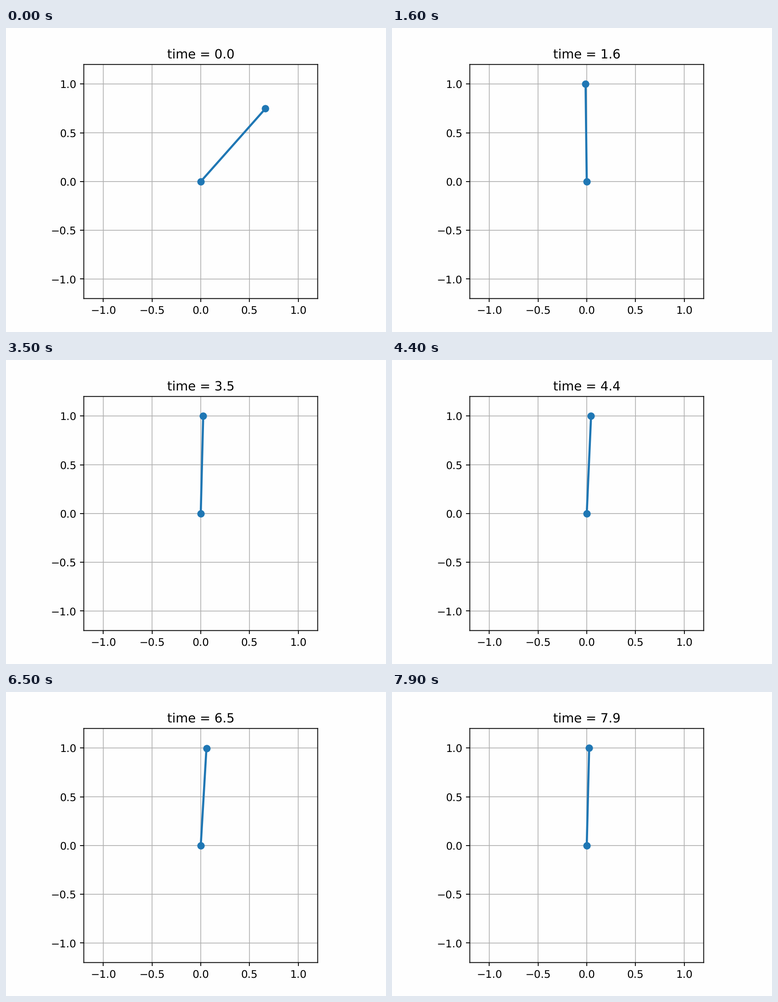
Animation, 837 px wide and 669 px high, one loop 8000 ms. Source, as a matplotlib script:

```python
import numpy as np
import matplotlib.pyplot as plt
from matplotlib.animation import FuncAnimation
from matplotlib.lines import Line2D
from matplotlib.spines import Spine

DPI = 167.3
FRAMES, STEP = 80, 100
PAPER = "#fefefe"

START, START_SPEED = 0.726, 0.5   # rad from upright, rad/s
CATCH, CATCH_TIME = -0.902, 0.9   # where the swing hands over to balancing
DECAY = 6.5


def swing(t):
    """Fall through the bottom and up again: cubic with given end speeds."""
    u = t / CATCH_TIME
    turn = CATCH + 2 * np.pi - START
    end_speed = -CATCH * DECAY
    return (START + turn * (3 - 2 * u) * u**2
            + CATCH_TIME * START_SPEED * u * (1 - u)**2
            + CATCH_TIME * end_speed * u**2 * (u - 1))


def balance(t):
    """Settle at the top into a small, steady wobble."""
    fade = np.exp(-DECAY * (t - CATCH_TIME))
    wobble = 0.03 + 0.034 * np.cos(2 * np.pi * 2.727 * (t - 2.5))
    return CATCH * fade + wobble * (1 - fade)


def angle(t):
    return swing(t) if t < CATCH_TIME else balance(t)


plt.rcParams["text.hinting"] = "no_hinting"
fig, ax = plt.subplots(figsize=(837.001 / DPI, 669.001 / DPI), dpi=DPI,
                       facecolor=PAPER)
ax.set(xlim=(-1.2, 1.2), ylim=(-1.2, 1.2), aspect="equal", facecolor=PAPER)
ticks = np.arange(-1, 1.1, 0.5)
ax.set_xticks(ticks)
ax.set_yticks(ticks)
ax.grid(lw=0.72)
rod, = ax.plot([], [], "o-", lw=2)
title = ax.set_title("time = 0.0")

# Keep lines at their exact sub-pixel places.
for kind in (Line2D, Spine):
    for artist in ax.findobj(kind):
        artist.set_snap(False)


def update(i):
    t = i * STEP / 1000
    a = angle(t)
    rod.set_data([0, np.sin(a)], [0, np.cos(a)])
    title.set_text(f"time = {t:.1f}")
    return rod, title


anim = FuncAnimation(fig, update, frames=FRAMES, interval=STEP,
                     repeat=True, repeat_delay=0, blit=False)
plt.show()
```
